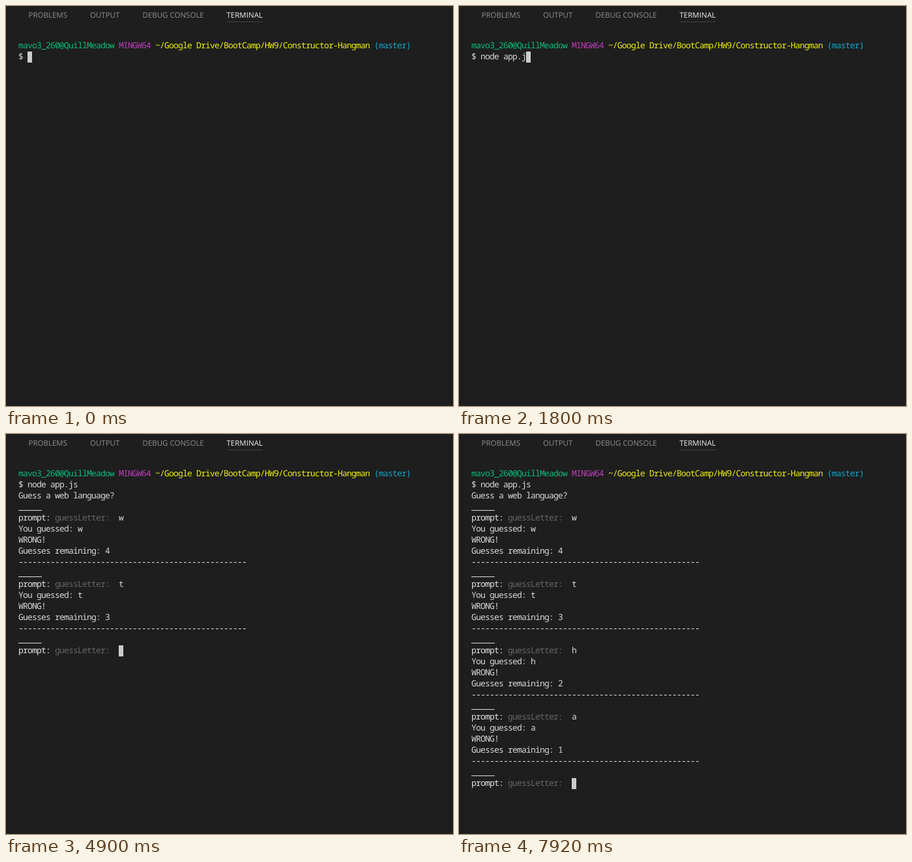
Recreate the animation shown at these times as an HTML page. Size 686 by 615 pixels, loop 8000 ms.

```html
<!DOCTYPE html>
<html lang="en">
<head>
<meta charset="utf-8">
<title>Terminal</title>
<style>
  html, body {
    margin: 0;
    width: 100%;
    height: 100%;
    overflow: hidden;
    background: #1e1e1e;
  }
  .tab {
    position: absolute;
    top: 5px;
    height: 19px;
    font: 11.5px/20px "Open Sans", "Noto Sans", sans-serif;
    text-rendering: geometricPrecision;
    white-space: pre;
    color: #8f8f8f;
  }
  .active {
    color: #f0f0f0;
    border-bottom: 1px solid #37474c;
  }
  #screen {
    position: absolute;
    left: 19px;
    top: 52px;
    margin: 0;
    font: 500 13px/17px "Noto Sans Mono", "DejaVu Sans Mono", monospace;
    font-variant-ligatures: none;
    letter-spacing: calc(7px - 1ch); /* 7px character cells */
    text-rendering: geometricPrecision;
    color: #dadada;
  }
  .user { color: #0dbc79; }
  .system { color: #bc3fbc; }
  .path { color: #f0f010; }
  .branch { color: #11a8cd; }
  .label { color: #e5e5e5; }
  .dim { color: #666; }
  #cursor {
    display: inline-block;
    position: relative;
    top: 1px;
    width: 7px;
    height: 17px;
    vertical-align: top;
    background: #ccc;
  }
</style>
</head>
<body>
<div class="tab" style="left:34.5px">PROBLEMS</div>
<div class="tab" style="left:129px">OUTPUT</div>
<div class="tab" style="left:209.5px">DEBUG CONSOLE</div>
<div class="tab active" style="left:338.5px">TERMINAL</div>
<pre id="screen"><span id="cursor"></span></pre>
<script>
  const LOOP = 8000;
  const screen = document.getElementById('screen');
  const cursor = document.getElementById('cursor');
  const chunks = [];

  // Schedule text to appear at the end of the output.
  function print(at, text, style = '') {
    const el = document.createElement('span');
    el.className = style;
    el.textContent = text;
    screen.insertBefore(el, cursor);
    chunks.push({ at, el });
  }

  function askLetter(at) {
    print(at, 'prompt:', 'label');
    print(at, ' guessLetter:  ', 'dim');
  }

  function guess(letter, typedAt, answeredAt, remaining) {
    print(typedAt, letter);
    print(answeredAt, `\nYou guessed: ${letter}\nWRONG!\nGuesses remaining: ${remaining}\n`
      + '-'.repeat(50) + '\n_____\n');
    askLetter(answeredAt);
  }

  print(0, 'mavo3_260@QuillMeadow ', 'user');
  print(0, 'MINGW64 ', 'system');
  print(0, '~/Google Drive/BootCamp/HW9/Constructor-Hangman ', 'path');
  print(0, '(master)\n', 'branch');
  print(0, '$ ');

  const keyTimes = [320, 400, 470, 630, 780, 1100, 1260, 1340, 1570, 1800, 1970];
  [...'node app.js'].forEach((key, i) => print(keyTimes[i], key));
  print(1970, '\n');
  print(2880, 'Guess a web language?\n_____\n');
  askLetter(2970);

  guess('w', 3490, 3570, 4);
  guess('t', 4820, 4900, 3);
  guess('h', 6380, 6440, 2);
  guess('a', 7850, 7920, 1);

  function draw() {
    const t = performance.now() % LOOP;
    for (const { at, el } of chunks) {
      const hidden = t < at;
      if (el.hidden !== hidden) el.hidden = hidden;
    }
    requestAnimationFrame(draw);
  }
  draw();
</script>
</body>
</html>
```
